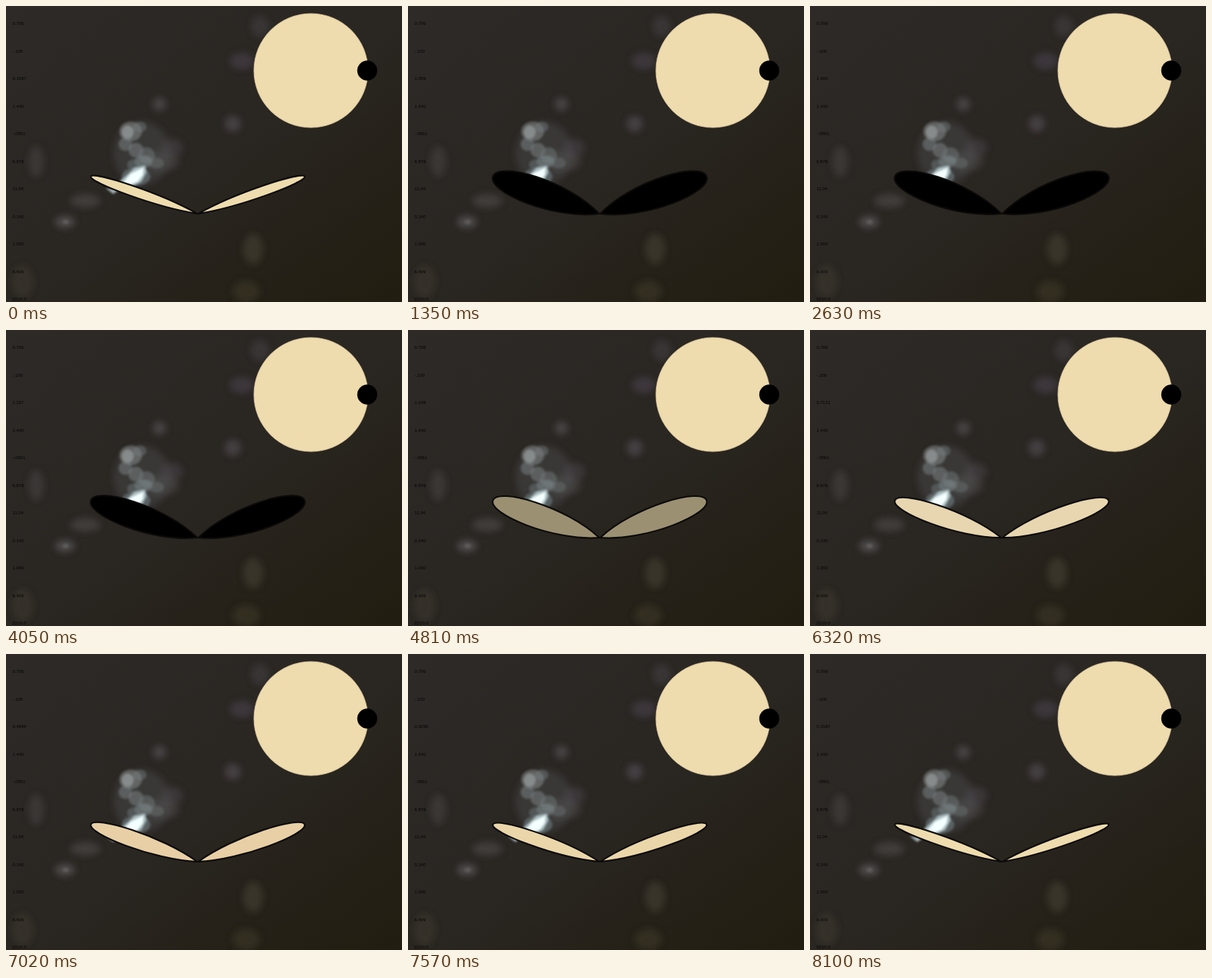
An HTML page that plays this animation: 524 by 392 pixels, repeating every 8.66 s.

```html
<!DOCTYPE html>
<html>
<head>
<meta charset="utf-8">
<style>
  html, body { margin: 0; width: 100%; height: 100%; overflow: hidden; background: #29251e; }
  svg { display: block; width: 524px; height: 392px; }
  text { font: 6px "Liberation Sans", Arial, sans-serif; fill: #050505; }
</style>
</head>
<body>
<svg viewBox="0 0 524 392">
  <defs>
    <linearGradient id="sky" x1="0" y1="0" x2="1" y2="1">
      <stop offset="0" stop-color="#2d2a27"/>
      <stop offset=".5" stop-color="#2a2622"/>
      <stop offset="1" stop-color="#211d10"/>
    </linearGradient>
    <radialGradient id="puff">
      <stop offset="0" stop-color="currentColor"/>
      <stop offset=".4" stop-color="currentColor" stop-opacity=".65"/>
      <stop offset="1" stop-color="currentColor" stop-opacity="0"/>
    </radialGradient>
    <filter id="soft" x="-50%" y="-50%" width="200%" height="200%"><feGaussianBlur stdDeviation="4"/></filter>
    <filter id="crisp" x="-50%" y="-50%" width="200%" height="200%"><feGaussianBlur stdDeviation="1.5"/></filter>
  </defs>
  <rect width="524" height="392" fill="url(#sky)"/>
  <g id="haze" filter="url(#soft)"></g>
  <g id="cloud" filter="url(#crisp)"></g>
  <g filter="url(#crisp)">
    <path d="M148 234L162 222L170 214L184 211L186 220L179 233L166 239Z" fill="#a9bcc0"/>
    <path d="M155 234L165 222L182 214L181 224L174 233L163 237Z" fill="#f4ffff"/>
    <path d="M132 241L150 243L142 249Z" fill="#a5b4b4"/>
  </g>
  <circle cx="403.5" cy="85.5" r="75.5" fill="#eedcae" stroke="#d9c49b" stroke-width=".8"/>
  <circle cx="478" cy="85.5" r="13.2"/>
  <g stroke="#0b0a08" stroke-width="2" stroke-linejoin="round">
    <path class="wing" transform="translate(253 275) rotate(199.3)"/>
    <path class="wing" transform="translate(254.5 275) rotate(-19.3)"/>
  </g>
  <g id="labels"></g>
</svg>
<script>
const NS = 'http://www.w3.org/2000/svg';
const $ = id => document.getElementById(id);

function add(parent, tag, attrs) {
  const el = document.createElementNS(NS, tag);
  for (const k in attrs) el.setAttribute(k, attrs[k]);
  return parent.appendChild(el);
}

// x, y, rx, ry, colour, opacity
function blobs(parent, list) {
  for (const [cx, cy, rx, ry, fill, opacity] of list)
    add(parent, 'ellipse', { cx, cy, rx, ry, fill, opacity });
}

blobs($('haze'), [
  [180, 195, 38, 42, '#5d6163', .3],
  [205, 206, 24, 13, '#6c6e6e', .28],
  [220, 188, 14, 12, '#55505a', .4],
  [203, 130, 9, 9, '#615d62', .5],
  [300, 156, 11, 11, '#5b5660', .5],
  [312, 73, 16, 11, '#4a4450', .55],
  [336, 27, 12, 14, '#453f48', .5],
  [40, 206, 10, 20, '#4b4648', .5],
  [78, 286, 13, 8, '#77777a', .45],
  [105, 258, 20, 9, '#585554', .5],
  [327, 322, 13, 20, '#4b4639', .5],
  [318, 378, 18, 14, '#3c382a', .6],
  [22, 365, 14, 22, '#3b372f', .6]
]);
blobs($('cloud'), [
  [165, 166, 15, 13, '#8b9192', .5],
  [161, 167, 8, 9, '#a6abab', .55],
  [177, 160, 9, 7, '#777d7e', .45],
  [158, 183, 9, 9, '#7d8485', .5],
  [172, 191, 10, 10, '#899193', .45],
  [186, 198, 11, 11, '#6f7778', .5],
  [182, 206, 12, 8, '#839092', .5],
  [170, 210, 10, 7, '#6c7677', .5],
  [199, 208, 10, 7, '#6a7071', .45],
  [172, 226, 19, 12, '#738488', .55],
  [79, 286, 4, 3, '#8e8e8e', .3]
]);

const labels = ['0.706', '-.100', '', '1.440', '-.0561', '6.876', '11.04', '0.140', '1.000', '6.409', '2210.0']
  .map((s, i) => {
    const el = add($('labels'), 'text', { x: 8.5, y: 25.3 + i * 36.5 });
    el.textContent = s;
    return el;
  });
const readout = labels[2];
const wings = document.querySelectorAll('.wing');

const LOOP = 8660, TICK = 70;
const VALUE = [
  [490, 1.571], [890, 1.57], [1840, 1.547], [2630, 1.493], [4030, 1.337],
  [5290, 1.029], [6270, .7121], [6970, .4994], [8090, .1597]
];
const COLOUR = [
  [.16, 238, 220, 174], [.5, 232, 207, 165], [.71, 231, 214, 175],
  [1.03, 214, 199, 158], [1.18, 140, 130, 103], [1.32, 0, 0, 0]
];

// Linear interpolation through rows of [x, ...values].
function along(keys, x) {
  if (x <= keys[0][0]) return keys[0].slice(1);
  const i = keys.findIndex(k => k[0] > x);
  if (i < 0) return keys[keys.length - 1].slice(1);
  const a = keys[i - 1], b = keys[i], p = (x - a[0]) / (b[0] - a[0]);
  return a.slice(1).map((v, j) => v + (b[j + 1] - v) * p);
}

function valueAt(t) {
  if (t < 390) return .1597;
  if (t < 490) return .9;
  const early = [490, 890, 1150, 1350, 1610, 1690, 1760, 1840];
  const held = t < 2000
    ? early.filter(s => s <= t).pop()
    : 2000 + Math.floor((t - 2000) / TICK) * TICK;
  return along(VALUE, held)[0];
}

function draw(t) {
  const v = valueAt(t);
  const s = .76 * v ** .45, a = 30 * s, b = 23.5 * s;
  const d = `M0 0C55 ${-a} 149 ${-b} 149 0C149 ${b} 55 ${a} 0 0Z`;
  const fill = `rgb(${along(COLOUR, v).map(Math.round)})`;
  for (const w of wings) {
    w.setAttribute('d', d);
    w.setAttribute('fill', fill);
  }
  readout.textContent = v.toPrecision(4);
}

function frame() {
  draw(performance.now() % LOOP);
  requestAnimationFrame(frame);
}
frame();
</script>
</body>
</html>
```
